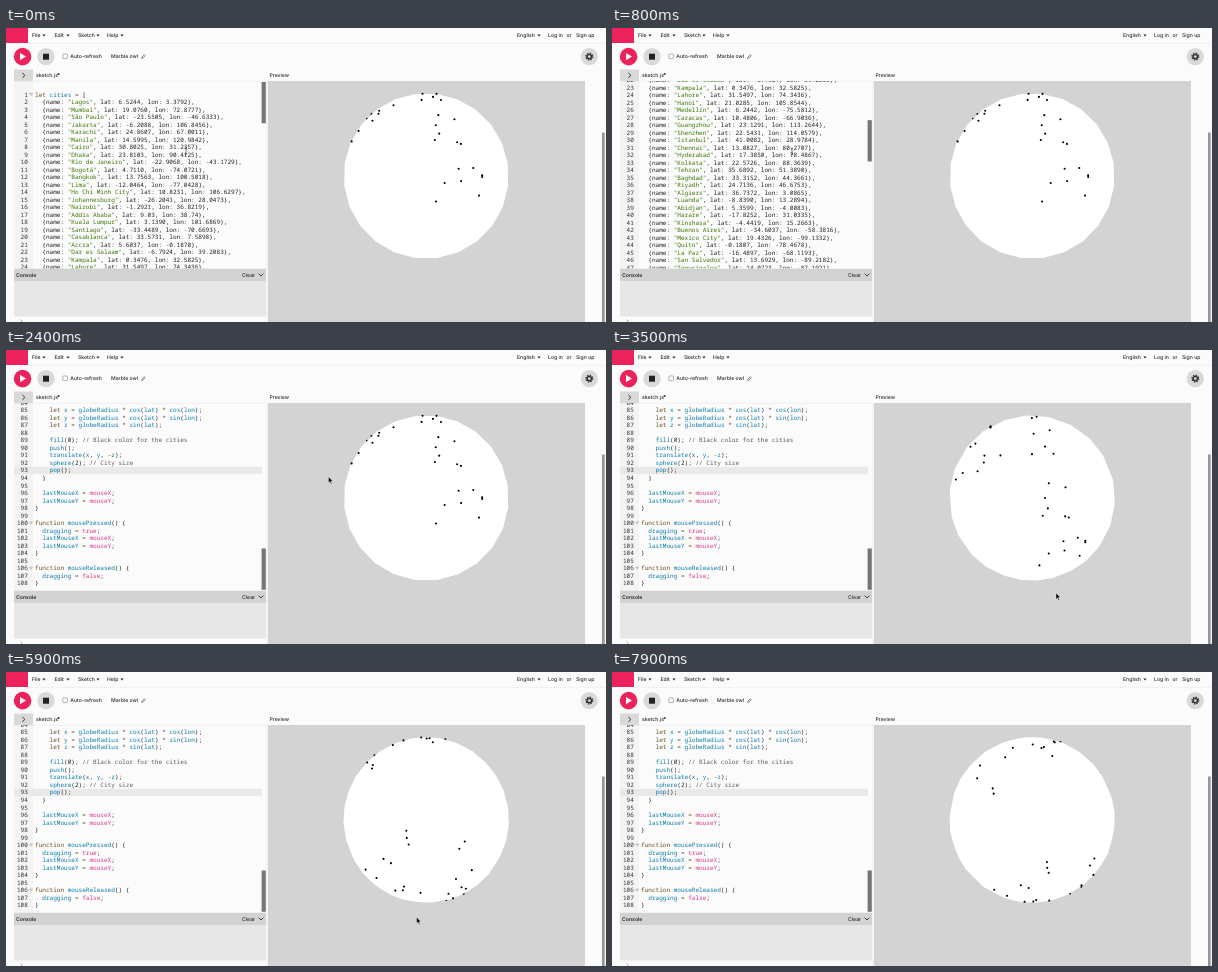
An HTML page that plays this animation: 600x294 px, repeating every 8 s.

```html
<!DOCTYPE html>
<html lang="en">
<head>
<meta charset="utf-8">
<title>Globe sketch in a code editor</title>
<style>
  html, body { margin: 0; width: 100%; height: 100%; overflow: hidden; background: #fbfbfb; }
  svg { display: block; width: 600px; height: 294px; }
  text { text-rendering: geometricPrecision; white-space: pre; }
  .ui { font: 500 5.15px Inter, "Open Sans", sans-serif; fill: #2a2a2a; }
  #code { font: 500 6.05px "Noto Sans Mono", "DejaVu Sans Mono", monospace; fill: #222; }
  .num { text-anchor: end; fill: #333; }
  .key, .op { fill: #704f21; }
  .name { fill: #0b7ca9; }
  .p5var { fill: #dc3787; }
  .str { fill: #3b7503; }
  .note { fill: #5a5a5a; }
  .dots { fill: none; stroke: #000; stroke-width: 2.1; stroke-linecap: round; }
</style>
</head>
<body>
<svg viewBox="0 0 600 294">
  <defs>
    <clipPath id="pane"><rect x="8" y="53" width="252" height="187.5"/></clipPath>
    <clipPath id="stage"><rect x="262" y="53" width="317" height="241"/></clipPath>
  </defs>
  <rect width="600" height="294" fill="#fbfbfb"/>

  <!-- menu bar -->
  <rect width="22" height="15" fill="#ed225d"/>
  <path d="M22 15.3H600" stroke="#d5d5d5" stroke-width=".5" stroke-dasharray="1.2 .8"/>

  <!-- toolbar -->
  <circle cx="16.6" cy="28.6" r="8.8" fill="#ed225d"/>
  <path d="M14 25v7.2l6-3.6z" fill="#fff"/>
  <circle cx="40" cy="28.6" r="8.7" fill="#d9d9d9"/>
  <rect x="37" y="25.7" width="6" height="6" fill="#222"/>
  <rect x="56.8" y="26" width="4.6" height="4.6" rx=".7" fill="#fff" stroke="#666" stroke-width=".5"/>
  <path d="M135.6 30.5l.4-1.4 2.3-2.4 1 1-2.4 2.3z" fill="none" stroke="#444" stroke-width=".6"/>
  <circle cx="583.3" cy="28.6" r="8.6" fill="#d9d9d9"/>
  <circle cx="583.3" cy="28.6" r="3.3" fill="none" stroke="#333" stroke-width="1.5" stroke-dasharray="1.3 1.292"/>
  <circle cx="583.3" cy="28.6" r="2.2" fill="none" stroke="#333" stroke-width="1.5"/>

  <!-- editor -->
  <rect x="8" y="41.5" width="19" height="11.7" fill="#d9d9d9"/>
  <path d="M16.4 45l2.5 2.4-2.5 2.4" fill="none" stroke="#333" stroke-width="1"/>
  <circle cx="52.6" cy="46" r="1" fill="#333"/>
  <rect x="8" y="53" width="19" height="188" fill="#f4f4f4"/>
  <path d="M8 53.2H260" stroke="#dedede" stroke-width=".5"/>
  <g clip-path="url(#pane)"><g id="code"></g></g>
  <rect id="thumb" x="255.6" y="54" width="4.2" height="41.3" fill="#767676"/>

  <!-- console -->
  <rect x="8" y="240.7" width="252" height="12.8" fill="#d2d2d2"/>
  <rect x="8" y="253.5" width="252" height="35" fill="#e7e7e7"/>
  <path d="M252.6 245.6l2.4 2.4 2.4-2.4" fill="none" stroke="#333" stroke-width=".9"/>
  <path d="M14.6 291.5l1.6 1.6-1.6 1.6" fill="none" stroke="#888" stroke-width=".7"/>

  <!-- preview -->
  <rect x="260" y="53" width="2" height="241" fill="#f4f4f4"/>
  <rect x="262" y="53" width="317" height="241" fill="#d3d3d3"/>
  <g clip-path="url(#stage)">
    <path class="dots" id="back"/>
    <polygon id="globe" fill="#fff"/>
    <path class="dots" id="front"/>
  </g>
  <rect x="596" y="104.5" width="2.7" height="190" fill="#969696"/>

  <g class="ui" id="labels"></g>
  <path id="beam" d="M-1.2-3.4Q0-3.4 0-2.6Q0-3.4 1.2-3.4M0-2.8V2.8M-1.2 3.4Q0 3.4 0 2.6Q0 3.4 1.2 3.4" fill="none" stroke="#222" stroke-width=".6"/>
  <path id="arrow" d="M-1-3v6.2l1.4-1.3 1 2.3 1-.4-1-2.3h2z" fill="#000" stroke="#fff" stroke-width=".4"/>
</svg>

<script>
const LOOP = 8000, STEP = 100;
const ROW = 7.52, CHAR = 3.63, LEFT = 29, BASE = 68.5;
const CX = 420.2, CY = 148, R = 79.3, DEPTH = 2 * Math.sqrt(3);  // camera distance in radii
const $ = id => document.getElementById(id);

const cities = `Lagos 6.5244 3.3792|Mumbai 19.0760 72.8777|São Paulo -23.5505 -46.6333
Jakarta -6.2088 106.8456|Karachi 24.8607 67.0011|Manila 14.5995 120.9842
Cairo 30.8025 31.2357|Dhaka 23.8103 90.4125|Rio de Janeiro -22.9068 -43.1729
Bogotá 4.7110 -74.0721|Bangkok 13.7563 100.5018|Lima -12.0464 -77.0428
Ho Chi Minh City 10.8231 106.6297|Johannesburg -26.2041 28.0473|Nairobi -1.2921 36.8219
Addis Ababa 9.03 38.74|Kuala Lumpur 3.1390 101.6869|Santiago -33.4489 -70.6693
Casablanca 33.5731 7.5898|Accra 5.6037 -0.1870|Dar es Salaam -6.7924 39.2083
Kampala 0.3476 32.5825|Lahore 31.5497 74.3436|Hanoi 21.0285 105.8544
Medellín 6.2442 -75.5812|Caracas 10.4806 -66.9036|Guangzhou 23.1291 113.2644
Shenzhen 22.5431 114.0579|Istanbul 41.0082 28.9784|Chennai 13.0827 80.2707
Hyderabad 17.3850 78.4867|Kolkata 22.5726 88.3639|Tehran 35.6892 51.3890
Baghdad 33.3152 44.3661|Riyadh 24.7136 46.6753|Algiers 36.7372 3.0865
Luanda -8.8390 13.2894|Abidjan 5.3599 -4.0083|Harare -17.8252 31.0335
Kinshasa -4.4419 15.2663|Buenos Aires -34.6037 -58.3816|Mexico City 19.4326 -99.1332
Quito -0.1807 -78.4678|La Paz -16.4897 -68.1193|San Salvador 13.6929 -89.2182
Tegucigalpa 14.0723 -87.1921`.split(/[|\n]/).map(s => s.match(/^(.+) (\S+) (\S+)$/).slice(1));

const sketch = `];

let globeRadius = 200;
let rotX = 0;
let rotY = 0;
let dragging = false;
let lastMouseX = 0;
let lastMouseY = 0;

function setup() {
  createCanvas(800, 800, WEBGL);
  angleMode(DEGREES);
}

function draw() {
  background(220);

  if (dragging) {
    let dx = mouseX - lastMouseX;
    let dy = mouseY - lastMouseY;
    rotY += dx;
    rotX -= dy;
  }

  rotateX(rotX * 0.1);  // Increase the multiplier for faster rotation
  rotateY(rotY * 0.1);  // Increase the multiplier for faster rotation

  // Draw the globe
  fill(255); // White color for the Earth
  noStroke();
  sphere(globeRadius);

  // Draw cities on the globe
  for (let city of cities) {
    let lat = city.lat;
    let lon = city.lon;

    let x = globeRadius * cos(lat) * cos(lon);
    let y = globeRadius * cos(lat) * sin(lon);
    let z = globeRadius * sin(lat);

    fill(0); // Black color for the cities
    push();
    translate(x, y, -z);
    sphere(2); // City size
    pop();
  }

  lastMouseX = mouseX;
  lastMouseY = mouseY;
}

function mousePressed() {
  dragging = true;
  lastMouseX = mouseX;
  lastMouseY = mouseY;
}

function mouseReleased() {
  dragging = false;
}`;
const lines = ['let cities = [',
  ...cities.map(([n, lat, lon]) => `  {name: "${n}", lat: ${lat}, lon: ${lon}},`),
  ...sketch.split('\n')];

// ---- interface text: x, words, menu triangle x, baseline, weight ----
const labels = [
  [26, 'File', 38], [48.5, 'Edit', 62], [72, 'Sketch', 92], [101, 'Help', 116], [511, 'English', 533],
  [542, 'Log in'], [560.5, 'or'], [570, 'Sign up'], [64.3, 'Auto-refresh', 0, 30.3], [105, 'Marble owl', 0, 30.3],
  [30, 'sketch.js', 0, 49], [263.5, 'Preview', 0, 49], [10, 'Console', 0, 249, 600], [236, 'Clear', 0, 249]];
$('labels').innerHTML = labels.map(([x, s, tri, y = 9.2, weight = 500]) =>
  `<text x="${x}" y="${y}" font-weight="${weight}">${s}</text>` +
  (tri ? `<path d="M${tri - 1.7} 6.5h3.4l-1.7 2z"/>` : '')).join('');

// ---- code listing ----
const TOKEN = /(\/\/.*)|(".*?")|\b(let|function|if|for|of)\b|\b(mouseX|mouseY|true|false|WEBGL|DEGREES)\b|(\.\w+|\w+(?=:)|\d[\d.]*)|([A-Za-z]\w*)|([-+*=]+)/g;
const KINDS = ['note', 'str', 'key', 'p5var', 'plain', 'name', 'op'];
const paint = s => s.replace(TOKEN, (m, ...g) => `<tspan class="${KINDS[g.findIndex(v => v)]}">${m}</tspan>`);
const label = (s, y) => {
  const indent = s.search(/\S/);
  return `<text xml:space="preserve" x="${LEFT + indent * CHAR}" y="${y}">${paint(s.trim())}</text>`;
};

let row = 0, listing = '';
lines.forEach((s, i) => {
  const y = BASE + row * ROW;
  if (s.trim() === 'pop();') listing += `<rect x="8" y="${y - 5.8}" width="248" height="${ROW}" fill="#e9e9e9"/>`;
  listing += `<text class="num" x="21.8" y="${y}">${i + 1}</text>`;
  if (/[{[]$/.test(s)) listing += `<path d="M23.6 ${y - 3.2}h3l-1.5 2.2z" fill="none" stroke="#777" stroke-width=".4"/>`;
  const wrapped = s.endsWith('faster rotation');
  if (s) listing += label(wrapped ? s.replace(/ rotation$/, '') : s, y);
  if (wrapped) listing += `<text class="note" x="${LEFT}" y="${BASE + ++row * ROW}">rotation</text>`;
  row++;
});
$('code').innerHTML = listing;

// ---- geometry ----
const rad = d => d * Math.PI / 180;
const cityPoints = cities.map(([, la, lo]) => {
  const lat = rad(+la), lon = rad(+lo);
  return [Math.cos(lat) * Math.cos(lon), Math.cos(lat) * Math.sin(lon), -Math.sin(lat)];
});
const mesh = [];
for (let i = 0; i <= 16; i++) for (let j = 0; j < 24; j++) {
  const u = rad(i * 11.25 - 90), v = rad(j * 15);
  mesh.push([Math.cos(u) * Math.sin(v), Math.sin(u), Math.cos(u) * Math.cos(v)]);
}

function projector(a, b) {
  const ca = Math.cos(rad(a)), sa = Math.sin(rad(a)), cb = Math.cos(rad(b)), sb = Math.sin(rad(b));
  return ([x, y, z]) => {
    const x1 = x * cb + z * sb, z1 = z * cb - x * sb;
    const y2 = y * ca - z1 * sa, z2 = y * sa + z1 * ca;
    const f = R / (1 - z2 / DEPTH);
    return [CX + x1 * f, CY + y2 * f, z2];
  };
}

function hull(pts) {
  pts.sort((p, q) => p[0] - q[0] || p[1] - q[1]);
  const half = list => {
    const h = [];
    for (const p of list) {
      while (h.length > 1) {
        const [o, q] = h.slice(-2);
        if ((q[0] - o[0]) * (p[1] - o[1]) - (q[1] - o[1]) * (p[0] - o[0]) > 0) break;
        h.pop();
      }
      h.push(p);
    }
    return h.slice(0, -1);
  };
  const lower = half(pts);
  return lower.concat(half(pts.reverse()));
}

// ---- motion ----
const scrollKeys = [[0, 0], [800, 172.4], [1500, 471.3], [2000, 652.9]];
// time, pointer x, pointer y, tilt, turn
const dragKeys = [
  [0, 180, 123, 93.75, 232.5], [2000, 180, 124, 93.75, 232.5], [2700, 431, 134, 93.75, 232.5],
  [3500, 445, 246, 65.4, 236], [3800, 453, 281, 56.6, 238.2], [4300, 397, 74, 56.6, 238.2],
  [5000, 520, 256, 10.8, 269.6], [5300, 527, 279, 5, 271.4], [5600, 480, 190, 5, 271.4],
  [6100, 366, 287, -19.5, 242.8], [6400, 480, 142, -19.5, 242.8], [6800, 370, 201, -34.3, 215.1],
  [7000, 355, 202, -34.3, 215.1], [7800, 582, 174, -27.2, 272.5]];

function at(keys, t) {
  const n = keys.findIndex(k => k[0] > t);
  if (n < 0) return keys[keys.length - 1].slice(1);
  const p = keys[n - 1], q = keys[n], u = (t - p[0]) / (q[0] - p[0]);
  return p.slice(1).map((v, i) => v + (q[i + 1] - v) * u);
}

const dotPath = pts => pts.map(p => `M${p[0].toFixed(2)} ${p[1].toFixed(2)}h.01`).join('');

function draw(t) {
  const [scroll] = at(scrollKeys, t);
  $('code').setAttribute('transform', `translate(0 ${-scroll})`);
  $('thumb').setAttribute('y', 54 + scroll * 0.2213);

  const [mx, my, tilt, turn] = at(dragKeys, t);
  const project = projector(tilt, turn);
  const dots = cityPoints.map(project);
  $('globe').setAttribute('points', hull(mesh.map(project)).map(p => p[0].toFixed(2) + ',' + p[1].toFixed(2)).join(' '));
  $('back').setAttribute('d', dotPath(dots.filter(p => p[2] <= 1 / DEPTH)));
  $('front').setAttribute('d', dotPath(dots.filter(p => p[2] > 1 / DEPTH)));

  const typing = mx < 256;
  for (const [id, on] of [['beam', typing], ['arrow', !typing && t < 7900]]) {
    $(id).setAttribute('transform', `translate(${mx} ${my})`);
    $(id).setAttribute('visibility', on ? 'visible' : 'hidden');
  }
}

const start = performance.now();
function tick() {
  const t = (performance.now() - start) % LOOP;
  draw(Math.floor(t / STEP) * STEP);
  requestAnimationFrame(tick);
}
tick();
</script>
</body>
</html>
```
